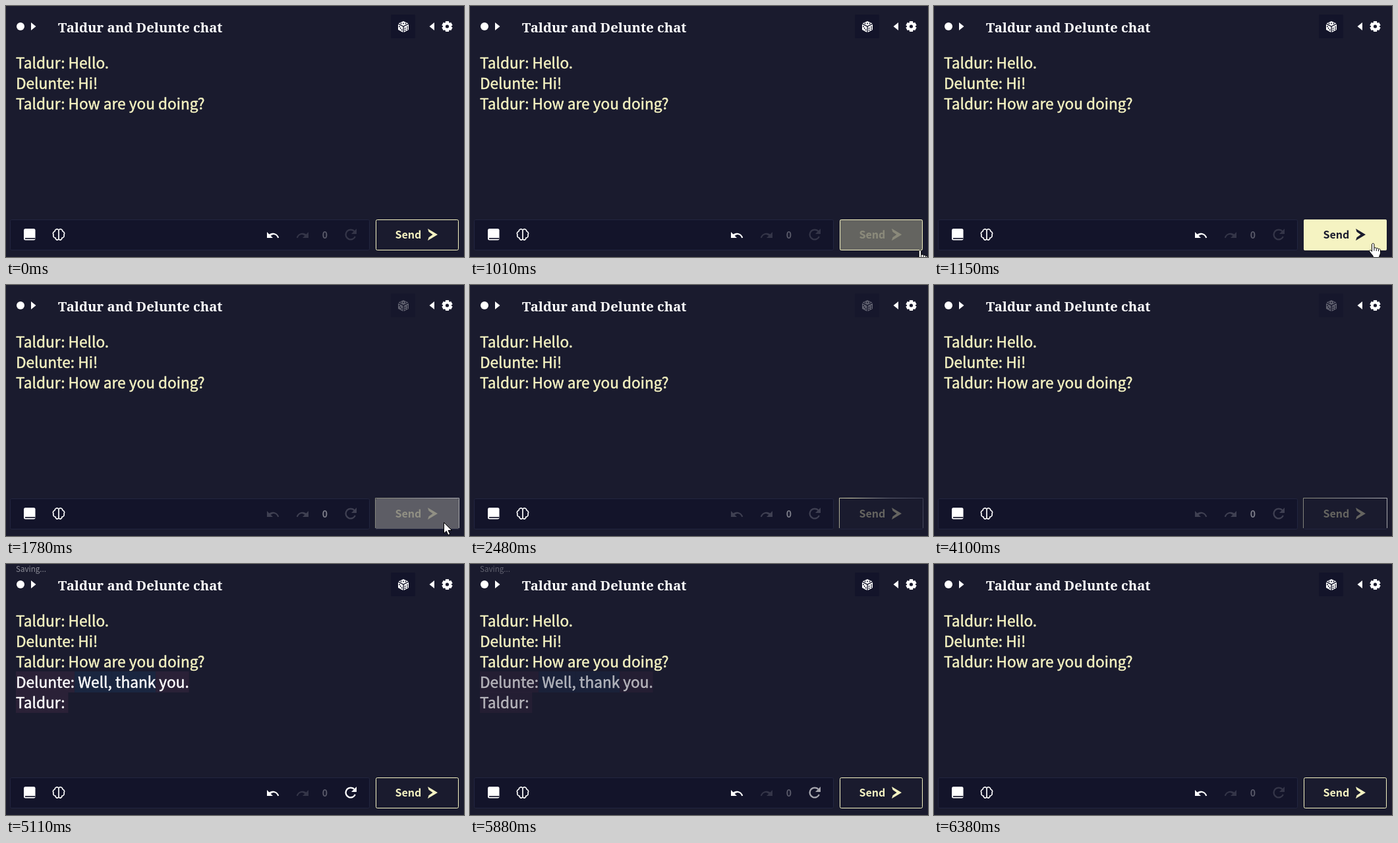
An HTML page with a canvas for the animation above (6400 ms loop, 695 px wide and 381 px high).

```html
<!DOCTYPE html>
<html lang="en">
<head>
<meta charset="utf-8">
<title>Chat</title>
<style>
html, body { margin: 0; width: 100%; height: 100%; overflow: hidden; background: #1a1b2e; }
canvas { display: block; }
</style>
</head>
<body>
<canvas id="stage" width="695" height="381"></canvas>
<script>
const ctx = document.getElementById('stage').getContext('2d');
const LOOP = 6400;
const BG = '#1a1b2e', PANEL = '#13142a', EDGE = '#22253f', CREAM = '#f5f3c2', WHITE = '#fff';
const SANS = '"Noto Sans CJK SC", "Noto Sans CJK JP", "Open Sans", sans-serif';
const BODY = '22.65px ' + SANS;
const LEFT = 15, FIRST_BASELINE = 94.7, LINE = 31;
const PURPLE = '#2a2137', BLUE = '#1a2640';

const HISTORY = ['Taldur: Hello.', 'Delunte: Hi!', 'Taldur: How are you doing?'];
const REPLY = [
  { text: 'Delunte:', row: 3, fill: PURPLE, at: 4180 },
  { text: ' Well,', row: 3, fill: BLUE, at: 4230 },
  { text: ' thank', row: 3, fill: BLUE, at: 4290 },
  { text: ' you.', row: 3, fill: PURPLE, at: 4340 },
  { text: 'Taldur: ', row: 4, fill: PURPLE, at: 4400 }
];

const ICONS = {
  undo: new Path2D('M-9-5V4H0L-3.3.7C2-3 6 0 7.2 4.3L9.3 3.6C7-3 0-5-5.6-1.6Z'),
  send: new Path2D('M-7.5-9 7.5 0-7.5 9-6 4.2 0 0-6-4.2Z'),
  right: new Path2D('M-3.5-6.1 4 0-3.5 6.1Z'),
  refreshTip: new Path2D('M9-9V-1H1Z'),
  brain: new Path2D('M0-8V8M0-7C-3-10-6-7-6-5-9-4-9-1-8 0-9 3-7 5-5 5-5 8-2 9 0 7M0-7C3-10 6-7 6-5 9-4 9-1 8 0 9 3 7 5 5 5 5 8 2 9 0 7'),
  hand: new Path2D('M0 1.5C0-.7 3.4-.7 3.4 1.5V7C4.5 5.8 6.4 6.2 6.8 7.6 8 6.6 9.6 7.2 10 8.6 11.2 7.8 13 8.6 13 10.2V14C13 17 11.2 18 11 21H2.2C2 18-1.6 15.6-3.4 12.6-4.8 10.4-2.3 9.2-1 10.8L0 12Z'),
  knuckles: new Path2D('M3.4 7V11M6.8 8V11.4M10 9V11.8'),
  arrow: new Path2D('M0 0V16.5L3.8 13 6.4 19 9.2 17.8 6.6 12H12Z'),
  dice: dicePath()
};

function dicePath() {
  const path = new Path2D('M0-8.5 7.5-5 0-1.2-7.5-5ZM-8-3.7-.7-.1V8.4L-8 4.6ZM8-3.7.7-.1V8.4L8 4.6Z');
  const pips = [[0, -5], [-3.5, -5], [3.5, -5], [-6, -.3], [-2.5, 4.7], [-4.3, 2.2], [2.6, 2.2], [6, .4], [2.6, 5.2], [6, 3.4]];
  for (const [x, y] of pips) {
    path.moveTo(x + 1, y);
    path.arc(x, y, 1, 0, 7);
  }
  return path;
}

const clamp = v => Math.max(0, Math.min(1, v));
const ramp = (t, from, to) => clamp((t - from) / (to - from));
const mix = (a, b, k) => a + (b - a) * k;
const smooth = k => k * k * (3 - 2 * k);

function at(x, y, draw, alpha = 1) {
  ctx.save();
  ctx.translate(x, y);
  ctx.globalAlpha *= alpha;
  draw();
  ctx.restore();
}

function icon(path, x, y, color = WHITE, alpha = 1, flip = 1) {
  at(x, y, () => {
    ctx.scale(flip, 1);
    ctx.fillStyle = color;
    ctx.fill(path, 'evenodd');
  }, alpha);
}

function text(str, x, y, font, color, alpha = 1) {
  at(x, y, () => {
    ctx.font = font;
    ctx.fillStyle = color;
    ctx.fillText(str, 0, 0);
  }, alpha);
}

// The story text is a little heavier than the regular weight.
function story(str, x, row, color) {
  const y = FIRST_BASELINE + row * LINE;
  text(str, x, y, BODY, color);
  at(x, y, () => {
    ctx.font = BODY;
    ctx.strokeStyle = color;
    ctx.lineWidth = .5;
    ctx.lineJoin = 'round';
    ctx.strokeText(str, 0, 0);
  });
}

function box(x, y, w, h, r, fill, stroke) {
  ctx.beginPath();
  ctx.roundRect(x, y, w, h, r);
  if (fill) { ctx.fillStyle = fill; ctx.fill(); }
  if (stroke) { ctx.lineWidth = 1; ctx.strokeStyle = stroke; ctx.stroke(); }
}

function gear() {
  ctx.fillStyle = WHITE;
  for (let i = 0; i < 6; i++) {
    ctx.rotate(Math.PI / 3);
    ctx.fillRect(-2.6, -8, 5.2, 5);
  }
  ctx.lineWidth = 4;
  ctx.strokeStyle = WHITE;
  ctx.beginPath();
  ctx.arc(0, 0, 4.6, 0, 7);
  ctx.stroke();
}

function refresh() {
  ctx.strokeStyle = ctx.fillStyle = WHITE;
  ctx.lineWidth = 2.3;
  ctx.beginPath();
  ctx.arc(0, 0, 7.4, .4, 5.5);
  ctx.stroke();
  ctx.fill(ICONS.refreshTip);
}

function header(on) {
  ctx.fillStyle = WHITE;
  ctx.beginPath();
  ctx.arc(22, 31, 6, 0, 7);
  ctx.fill();
  icon(ICONS.right, 41.5, 31);
  text('Taldur and Delunte chat', 79, 40, 'bold 20.3px "Noto Serif", serif', WHITE);
  at(0, 0, () => box(584, 13, 37, 36, 1, PANEL), mix(.5, 1, on));
  icon(ICONS.dice, 603, 31.5, WHITE, mix(.32, 1, on));
  icon(ICONS.right, 646.5, 31, WHITE, 1, -1);
  at(669.5, 31, gear);
}

function toolbar(on, retry) {
  box(6.5, 324.5, 545, 46, 2, PANEL, EDGE);
  box(27, 338, 17.5, 17.5, 2.5, WHITE);
  ctx.fillStyle = PANEL;
  ctx.fillRect(29, 352, 15.5, 1.7);
  at(80, 347, () => {
    ctx.strokeStyle = WHITE;
    ctx.lineWidth = 1.7;
    ctx.stroke(ICONS.brain);
  });
  const dim = mix(.19, .14, on);
  icon(ICONS.undo, 405, 348, WHITE, mix(.19, 1, on));
  icon(ICONS.undo, 450, 348, WHITE, dim, -1);
  text('0', 479.7, 353, '600 14px ' + SANS, WHITE, mix(.45, .3, on));
  at(523, 347, refresh, Math.max(dim, retry));
}

function reply(t) {
  let row = 0, x = LEFT;
  ctx.font = BODY;
  const shown = REPLY.filter(part => t >= part.at).map(part => {
    if (part.row !== row) { row = part.row; x = LEFT; }
    const placed = { ...part, x, w: ctx.measureText(part.text).width };
    x += placed.w;
    return placed;
  });
  for (const p of shown) {
    ctx.fillStyle = p.fill;
    ctx.fillRect(p.x, 163 + (p.row - 3) * LINE, p.w, 32);
  }
  for (const p of shown) story(p.text, p.x, p.row, WHITE);
  if (t >= 4640 && t < 5110) {
    ctx.fillStyle = WHITE;
    ctx.fillRect(94, 194, 1, 32);
  }
  if (t >= 4500) text('Saving...', LEFT, 12, '11.6px ' + SANS, '#8c8d97');
}

// A soft highlight slides along the outline while the reply is awaited.
function busyBorder(t) {
  const swing = t < 2250 ? 1 : smooth(ramp(t, 2710, 3280));
  const glow = ctx.createLinearGradient(560, 371, 688, 323);
  const cream = a => `rgba(245,243,194,${a})`;
  const grey = a => `rgba(225,225,220,${a})`;
  glow.addColorStop(0, cream(mix(.6, .45, swing)));
  glow.addColorStop(.25, cream(mix(.85, .5, swing)));
  glow.addColorStop(.65, grey(mix(.3, .6, swing)));
  glow.addColorStop(1, grey(mix(.14, .72, swing)));
  box(560.5, 323.5, 127, 47, 2, null, EDGE);
  ctx.beginPath();
  ctx.moveTo(560.5, 369);
  ctx.lineTo(560.5, 323.5);
  ctx.lineTo(687.5, 323.5);
  ctx.lineTo(687.5, 369);
  ctx.strokeStyle = glow;
  ctx.stroke();
}

function sendButton(t, on) {
  const clicked = t >= 1600;
  const drained = t < 1780 ? mix(1, .32, ramp(t, 1600, 1760)) : mix(.32, 0, ramp(t, 1800, 2050));
  const fill = clicked ? drained : ramp(t, 950, 1130);
  at(0, 0, () => box(561, 324, 126, 47, 2, clicked && t > 1700 ? '#e8e8d8' : CREAM), fill);
  at(0, 0, () => box(561.5, 324.5, 125, 46, 2, null, CREAM), on);
  at(0, 0, () => busyBorder(t), 1 - on);
  const label = (color, alpha) => {
    text('Send', 590.5, 353, '600 16px ' + SANS, color, alpha);
    icon(ICONS.send, 647.5, 347, color, alpha);
  };
  const dark = clicked ? 1 - ramp(t, 1600, 1700) : fill;
  label(CREAM, (1 - dark) * mix(.34, 1, on));
  if (dark > 0) label(BG, dark);
}

function pointer(t) {
  if (t < 910 || t >= 2180) return;
  const enter = 1 - smooth(ramp(t, 880, 1150));
  const leave = smooth(ramp(t, 1860, 2180));
  const away = Math.max(enter, leave);
  const hand = t < 1640 && t >= 950;
  at(mix(664, 696, away) + .5, mix(360, 380, away) + .5, () => {
    const path = hand ? ICONS.hand : ICONS.arrow;
    ctx.fillStyle = WHITE;
    ctx.strokeStyle = '#000';
    ctx.lineWidth = 1;
    ctx.fill(path);
    ctx.stroke(path);
    if (hand) ctx.stroke(ICONS.knuckles);
  });
}

function draw(t) {
  const on = t < 3000 ? 1 - ramp(t, 1600, 1760) : ramp(t, 4110, 4350);
  const fadeStep = t < 5680 ? 0 : Math.min(8, Math.floor((t - 5680) / 100) + 1);
  const keep = 1 - fadeStep / 8;

  ctx.fillStyle = BG;
  ctx.fillRect(0, 0, 695, 381);
  header(on);
  HISTORY.forEach((line, row) => story(line, LEFT, row, CREAM));
  at(0, 0, () => reply(t), keep);
  toolbar(on, ramp(t, 4110, 4350) * keep);
  sendButton(t, on);
  pointer(t);
}

function frame() {
  draw(performance.now() % LOOP);
  requestAnimationFrame(frame);
}
frame();
</script>
</body>
</html>
```
